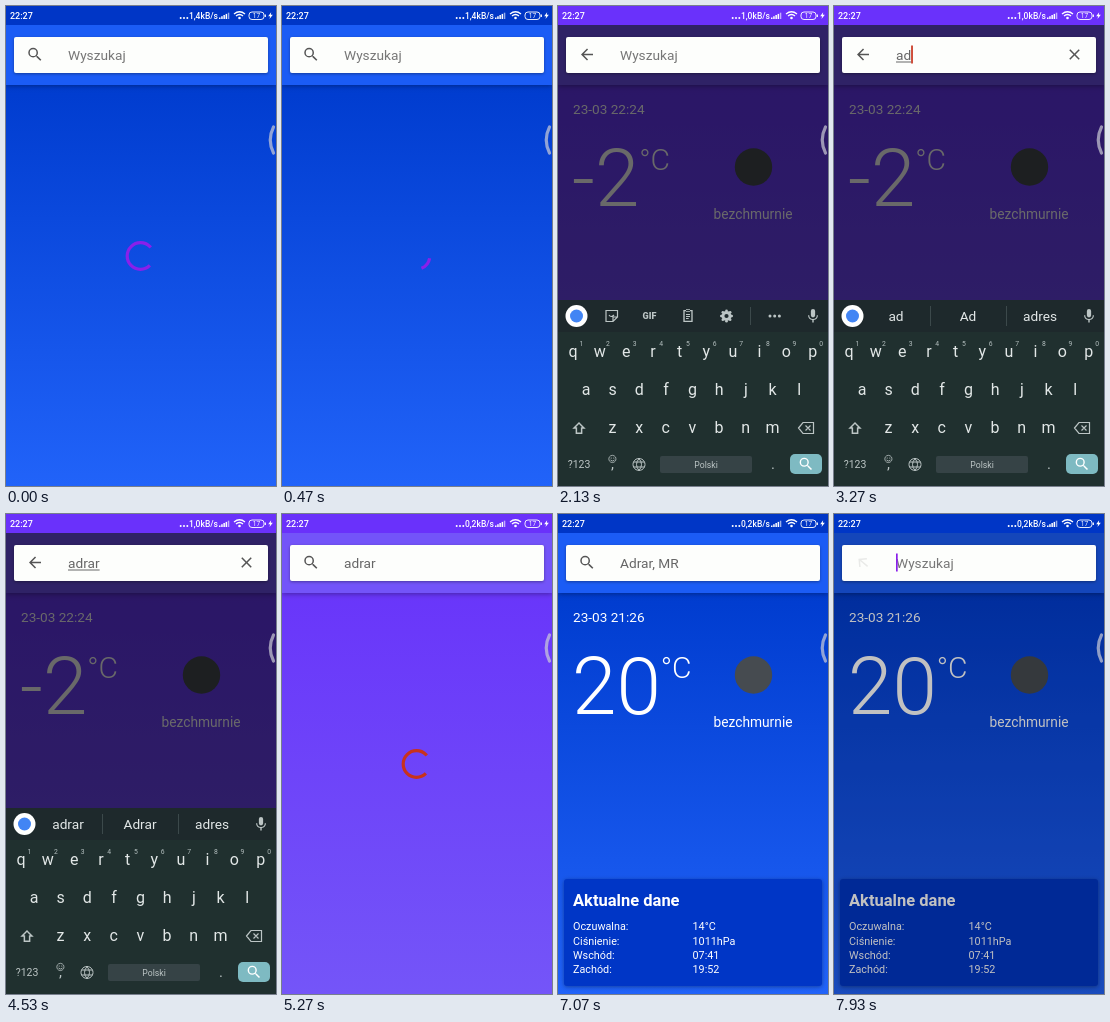
An HTML page with a canvas for the animation above (8000 ms loop, 270 by 480 pixels).

```html
<!DOCTYPE html>
<html lang="pl">
<head>
<meta charset="utf-8">
<title>Pogoda</title>
<style>
  html, body { margin: 0; width: 100%; height: 100%; overflow: hidden; background: #0038c8; }
  canvas { display: block; width: 270px; height: 480px; }
</style>
</head>
<body>
<canvas id="stage"></canvas>
<script>
const W = 270, H = 480, LOOP = 8000;
const canvas = document.getElementById('stage');
const ctx = canvas.getContext('2d');
const ratio = window.devicePixelRatio || 1;
canvas.width = W * ratio;
canvas.height = H * ratio;

// Moments in ms
const FIRST_LOAD = 700, TAP = 1590, SUBMIT = 4650, RELOAD = 4750, SECOND_LOAD = 5900, TAP_AGAIN = 7820;
const KEY_TIMES = [2700, 3000, 3300, 3600, 3900];
const TYPED = 'adrar';

const BLUE = { status: '#0036c6', header: '#1b5cf5', top: '#003ccf', bottom: '#2163f9', card: '#0036c6', accent: '#8a20ea' };
const PURPLE = { status: '#6a31fb', header: '#7354f9', top: '#6936fa', bottom: '#7455f8', card: '#6a33fb', accent: '#c8321c' };
const FIRST_WEATHER = { date: '23-03 22:24', temp: '-2', values: ['-7°C', '1035hPa', '05:39', '18:01'] };
const SECOND_WEATHER = { date: '23-03 21:26', temp: '20', values: ['14°C', '1011hPa', '07:41', '19:52'] };
const LABELS = ['Oczuwalna:', 'Ciśnienie:', 'Wschód:', 'Zachód:'];

// Icons on a 24-unit grid
const ICONS = {
  search: 'M15.5 14h-.79l-.28-.27A6.47 6.47 0 0 0 16 9.5 6.5 6.5 0 1 0 9.5 16c1.61 0 3.09-.59 4.23-1.57l.27.28v.79l5 4.99L20.49 19zm-6 0a4.5 4.5 0 1 1 0-9 4.5 4.5 0 0 1 0 9z',
  back: 'M20 11H7.83l5.59-5.59L12 4l-8 8 8 8 1.41-1.41L7.83 13H20z',
  close: 'M19 6.41 17.59 5 12 10.59 6.41 5 5 6.41 10.59 12 5 17.59 6.41 19 12 13.41 17.59 19 19 17.59 13.41 12z',
  mic: 'M12 14a3 3 0 0 0 3-3V5a3 3 0 0 0-6 0v6a3 3 0 0 0 3 3zM17.3 11a5.3 5.3 0 0 1-10.6 0H5a7 7 0 0 0 6 6.7V21h2v-3.3A7 7 0 0 0 19 11z',
  shift: 'M12 4 3 13h4.5v7h9v-7H21zm0 2.8 4.2 4.2h-1.7v7h-5v-7H7.800z',
  clipboard: 'M5 3h14v18H5zm2 2v14h10V5zM9 2h6v4H9zM9 9h6v1.500H9zm0 3h6v1.500H9zm0 3h4v1.500H9z',
  bolt: 'M14 2 5 14h6l-2 8 10-13h-6z'
};
for (const name in ICONS) ICONS[name] = new Path2D(ICONS[name]);

const clamp = v => Math.max(0, Math.min(1, v));
const progress = (t, start, length) => clamp((t - start) / length);
const smooth = p => (1 - Math.cos(Math.PI * p)) / 2;

function text(str, x, y, size, color, { weight = 400, align = 'left' } = {}) {
  ctx.font = `${weight} ${size}px Roboto, sans-serif`;
  ctx.textAlign = align;
  ctx.fillStyle = color;
  ctx.fillText(str, x, y);
  return ctx.measureText(str).width;
}

function rect(x, y, w, h, color, radius = 0) {
  ctx.fillStyle = color;
  ctx.beginPath();
  ctx.roundRect(x, y, w, h, radius);
  ctx.fill();
}

function circle(x, y, r, color) {
  ctx.fillStyle = color;
  ctx.beginPath();
  ctx.arc(x, y, r, 0, Math.PI * 2);
  ctx.fill();
}

function stroke(path, color, width = 1.2) {
  ctx.strokeStyle = color;
  ctx.lineWidth = width;
  ctx.stroke(new Path2D(path));
}

function icon(name, x, y, size, color, { angle = 0, alpha = 1 } = {}) {
  ctx.save();
  ctx.globalAlpha = alpha;
  ctx.translate(x, y);
  ctx.rotate(angle * Math.PI / 180);
  ctx.scale(size / 24, size / 24);
  ctx.translate(-12, -12);
  ctx.fillStyle = color;
  ctx.fill(ICONS[name], name === 'mic' ? 'nonzero' : 'evenodd');
  ctx.restore();
}

function withShadow(blur, alpha, draw) {
  ctx.save();
  ctx.shadowColor = `rgba(0,0,0,${alpha})`;
  ctx.shadowBlur = blur * ratio;
  ctx.shadowOffsetY = ratio;
  draw();
  ctx.restore();
}

function drawBackground(theme) {
  const fade = ctx.createLinearGradient(0, 79, 0, H);
  fade.addColorStop(0, theme.top);
  fade.addColorStop(1, theme.bottom);
  rect(0, 79, W, H - 79, fade);
  withShadow(5, 0.35, () => rect(0, 18, W, 61, theme.header));
}

function drawStatus(theme, speed) {
  rect(0, 0, W, 19, theme.status);
  text('22:27', 4, 13, 9, '#fff', { weight: 500 });
  text(speed + 'kB/s', 212, 13, 8.5, '#fff', { weight: 500, align: 'right' });
  for (let i = 0; i < 3; i++) circle(174.7 + i * 3.3, 12, 1, '#fff');
  for (let i = 0; i < 5; i++) rect(213 + i * 2.2, 11.5 - i * 1.2, 1.5, 1.5 + i * 1.2, i < 4 ? '#fff' : '#fff9');
  stroke('M228 8Q233.500 3.500 239 8M230 10Q233.500 7 237 10', '#fff', 1.3);
  circle(233.5, 12, 1.3, '#fff');
  ctx.strokeStyle = '#fff';
  ctx.lineWidth = 0.9;
  ctx.beginPath();
  ctx.roundRect(243, 6, 15, 7.5, 3);
  ctx.stroke();
  rect(258.7, 8.5, 1.2, 2.5, '#fff');
  text('17', 250.5, 12.2, 6.5, '#fff', { align: 'center' });
  icon('bolt', 264.5, 9.7, 8, '#fff');
}

// Indeterminate ring; its arc is longest when elapsed is 0
function drawSpinner(elapsed, color) {
  const cycles = elapsed / 1333 + 0.5;
  const phase = cycles - Math.floor(cycles);
  const head = 270 * smooth(clamp(phase * 2));
  const tail = 270 * smooth(clamp(phase * 2 - 1));
  const base = 45 + 90 * (phase - 0.5) + elapsed * 0.162;
  ctx.strokeStyle = color;
  ctx.lineWidth = 3.2;
  ctx.beginPath();
  ctx.arc(134.5, 250, 13.3, (base + tail) * Math.PI / 180, (base + head + 5) * Math.PI / 180);
  ctx.stroke();
}

function drawWeather(theme, weather) {
  text(weather.date, 15, 108, 13.6, '#fff');
  const width = text(weather.temp, 14, 200, 80, '#fff', { weight: 300 });
  text('°C', 14 + width, 164, 30, '#fff', { weight: 300 });
  circle(195.5, 161, 18.7, '#464b50');
  text('bezchmurnie', 195, 213, 13.75, '#fff', { align: 'center' });
  withShadow(4, 0.35, () => rect(6, 365, 258, 107, theme.card, 3));
  text('Aktualne dane', 15, 391.5, 16.5, '#fff', { weight: 700 });
  LABELS.forEach((label, i) => {
    const y = 416.3 + i * 14.3;
    text(label, 15, y, 10.8, '#fff');
    text(weather.values[i], 134.5, y, 10.8, '#fff');
  });
}

function drawSearchBox(t, theme, query, focusedAt) {
  withShadow(3, 0.35, () => rect(8, 31, 254, 36, '#fdfefc', 2));
  const focused = focusedAt !== null;
  if (focused) {
    const turn = smooth(progress(t, focusedAt, 500));
    icon('back', 29, 48.5, 18, '#555', { angle: 45 * (1 - turn), alpha: turn });
  } else {
    const alpha = t > SUBMIT ? smooth(progress(t, SUBMIT, 400)) : 1;
    icon('search', 29, 48.5, 18, '#555', { alpha });
  }
  const width = text(query || 'Wyszukaj', 62, 53.5, 13.7, query ? '#666' : '#777');
  if (!focused) return;

  const lastKey = KEY_TIMES.filter(k => k <= t).pop();
  const blinkStart = focusedAt === TAP && lastKey ? lastKey : focusedAt;
  if ((t - blinkStart) % 1000 < 500) rect(62 + (query ? width : 0), 39.5, 1.7, 18, theme.accent);
  if (query) {
    rect(62, 55.5, width, 1, '#666');
    icon('close', 240.5, 48.5, 18, '#555');
  }
}

function drawSuggestions(query) {
  const capital = query[0].toUpperCase() + query.slice(1);
  [query, capital, query === 'a' ? 'ale' : 'adres'].forEach((word, i) =>
    text(word, 62 + i * 72, 315, 13.7, '#e2e7e7', { align: 'center' }));
  rect(96, 300, 1, 20, '#3c494b');
  rect(172, 300, 1, 20, '#3c494b');
}

function drawTools(color) {
  stroke('M48 304.500H59.500V311L55 315.500H48ZM59.500 311H55V315.500M51 309Q53 312 56 309', color);
  text('GIF', 91.5, 313.2, 9, color, { weight: 900, align: 'center' });
  icon('clipboard', 130, 310, 16, color);
  ctx.strokeStyle = color;
  ctx.lineWidth = 3;
  ctx.beginPath();
  ctx.arc(168.5, 310, 3.6, 0, Math.PI * 2);
  ctx.stroke();
  for (let i = 0; i < 8; i++) {
    const a = i * Math.PI / 4;
    circle(168.5 + 5.2 * Math.cos(a), 310 + 5.2 * Math.sin(a), 1.3, color);
  }
  rect(192, 301, 1, 18, '#3c494b');
  for (let i = 0; i < 3; i++) circle(212 + i * 4.7, 310, 1.5, color);
}

function drawKeyRow(letters, x, y, numbered) {
  [...letters].forEach((letter, i) => {
    const cx = x + i * 26.65;
    text(letter, cx, y, 16, '#e2e7e7', { align: 'center' });
    if (numbered) text((i + 1) % 10, cx + 8.3, y - 11.5, 6.8, '#b4bfbf', { align: 'center' });
  });
}

function drawKeyboard(shown, query) {
  const light = '#bcc5c5';
  ctx.save();
  ctx.translate(0, 186 * (1 - shown));
  rect(0, 294, W, 186, '#20302f');
  rect(0, 294, W, 32, '#1e292c');
  circle(18.500, 310, 11, '#fff');
  circle(18.500, 310, 6.5, '#4285f4');
  if (query) drawSuggestions(query);
  else drawTools(light);
  icon('mic', 255, 310, 17, light);

  drawKeyRow('qwertyuiop', 15, 351, true);
  drawKeyRow('asdfghjkl', 28, 389);
  drawKeyRow('zxcvbnm', 54.5, 427);
  icon('shift', 21, 422, 18, light);
  stroke('M240.500 422 245 416.500H255.500V427.500H245ZM247.500 419.500 252.500 424.500M252.500 419.500 247.500 424.500', light);

  text('?123', 21, 462, 10.5, light, { align: 'center' });
  text(',', 54.5, 463, 15, light, { align: 'center' });
  stroke('M58 453A3.600 3.600 0 1 1 58 452.900M52.500 454Q54.500 456 56.500 454', light, 0.8);
  circle(53.200, 452, 0.6, light);
  circle(55.800, 452, 0.6, light);
  stroke('M87 458.500A6 6 0 1 1 87 458.400M75.500 456H86.500M75.500 461H86.500M81 452.500Q76 458.500 81 464.500Q86 458.500 81 452.500', light, 1);
  rect(102, 450, 92, 17, '#364346', 2);
  text('Polski', 148, 461.5, 8.7, light, { align: 'center' });
  text('.', 215, 463, 15, light, { align: 'center' });
  rect(232, 448, 32, 20, '#7ebac2', 5);
  icon('search', 248, 458, 17, '#fff');
  ctx.restore();
}

function render(t) {
  const theme = t < FIRST_LOAD || t >= SECOND_LOAD ? BLUE : PURPLE;
  const speed = t < 1000 ? '1,4' : t < 4900 ? '1,0' : '0,2';
  const focusedAt = t >= TAP_AGAIN ? TAP_AGAIN : t >= TAP && t < SUBMIT ? TAP : null;
  const typed = TYPED.slice(0, KEY_TIMES.filter(k => k <= t).length);
  const query = t >= TAP_AGAIN ? '' : t >= SECOND_LOAD ? 'Adrar, MR' : typed;

  ctx.setTransform(ratio, 0, 0, ratio, 0, 0);
  drawBackground(theme);
  if (t < FIRST_LOAD) drawSpinner(t, theme.accent);
  else if (t >= RELOAD && t < SECOND_LOAD) drawSpinner(t - 5270, theme.accent);
  else drawWeather(theme, t < RELOAD ? FIRST_WEATHER : SECOND_WEATHER);

  const dim = smooth(progress(t, TAP, 250)) - smooth(progress(t, SUBMIT, 250)) + smooth(progress(t, TAP_AGAIN, 250));
  rect(0, 19, W, H - 19, `rgba(0,0,0,${0.588 * dim})`);
  drawSearchBox(t, theme, query, focusedAt);

  const rise = 1 - (1 - progress(t, 1800, 220)) ** 3;
  const shown = rise - progress(t, SUBMIT, 150) ** 2;
  if (shown > 0) drawKeyboard(shown, typed);

  ctx.lineCap = 'round';
  stroke('M267.500 121Q261 134 267.500 147', 'rgba(205,205,215,.7)', 3.2);
  ctx.lineCap = 'butt';
  drawStatus(theme, speed);
}

function tick() {
  render(performance.now() % LOOP);
  requestAnimationFrame(tick);
}
tick();
</script>
</body>
</html>
```
